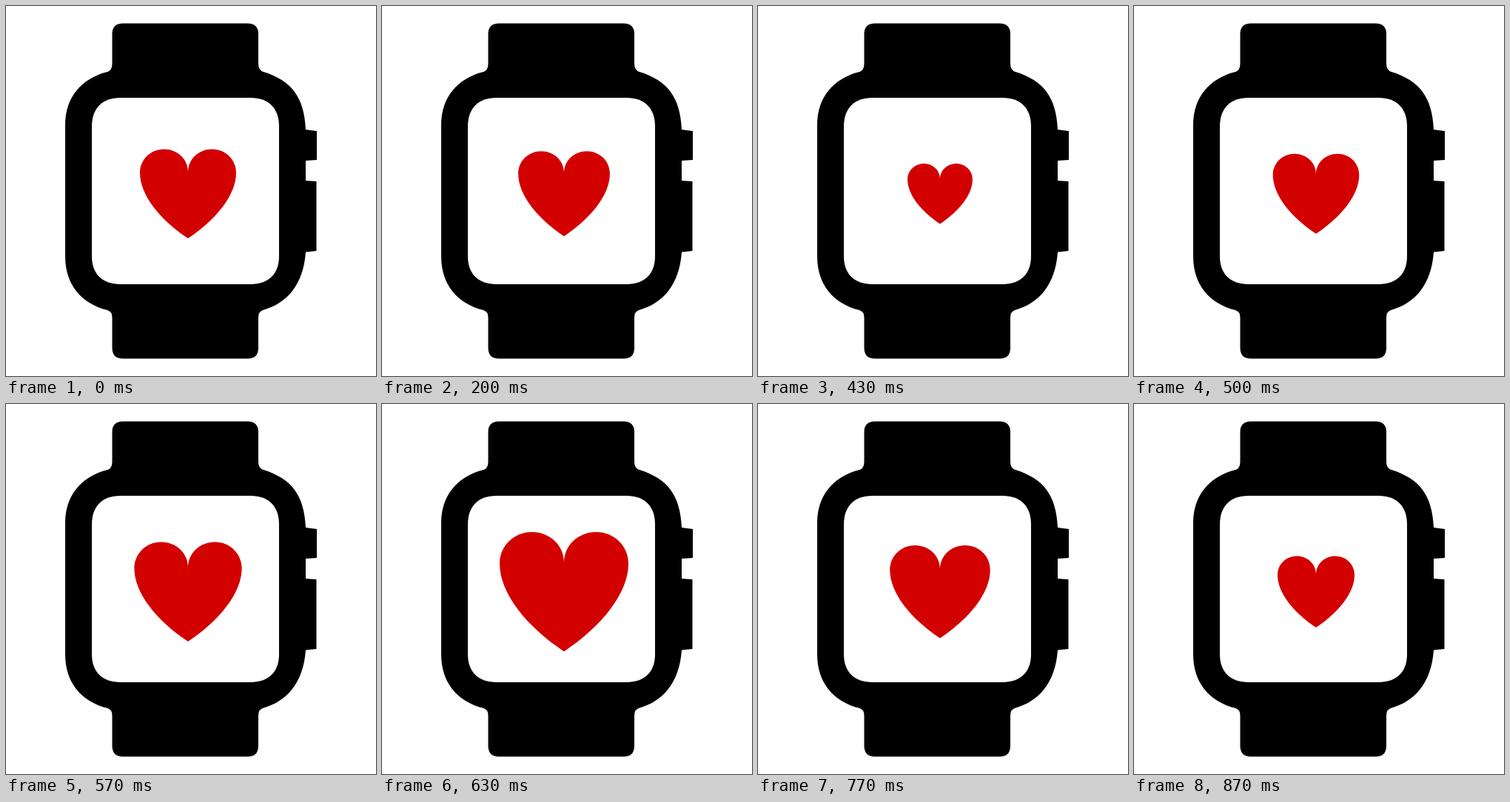
Animation, 500 px wide and 500 px high, one loop 960 ms. Source, as an HTML page:

```html
<!DOCTYPE html>
<html lang="en">
<head>
<meta charset="utf-8">
<title>Heart rate watch</title>
<style>
  html, body { margin: 0; width: 100%; height: 100%; overflow: hidden; background: #fff; }
  svg { display: block; width: 100vw; height: 100vh; }
</style>
</head>
<body>
<svg viewBox="0 0 500 500">
  <path d="M158 23.5H326.500Q341 23.500 341 38V78Q341 87 348 89C386 101 403 123 405 167
    L420 169V208L405 209V236L419.500 237V331L405 332.500C402 376 380 402 347 411Q341 413 341 421
    V462Q341 476.500 326.500 476.500H158Q143.500 476.500 143.500 462V421Q143.500 413 137 411
    C102 402 80 377 80 338V161C80 123 102 98 137 89Q143.500 87 143.500 78V38Q143.500 23.500 158 23.500Z"/>
  <path fill="#fff" d="M155 124H330C355 124 369 138 369 163V338C369 362 355 376 330 376H155
    C130 376 116 362 116 338V163C116 138 130 124 155 124Z"/>
  <path id="heart" fill="#d30000" d="M0-37C0-59-18-76-41-76S-82-58-82-36C-82 2-48 44 0 76
    C48 44 82 2 82-36C82-58 64-76 41-76S0-59 0-37Z"/>
</svg>
<script>
  const LOOP = 960, FPS = 30, HEART_WIDTH = 164;
  // [tick, heart width], linear in between
  const keys = [[0, 130], [4.8, 130], [13, 87.8], [19, 174], [23, 135.5], [26, 104], [29, 104]];
  const heart = document.getElementById('heart');

  function widthAt(tick) {
    const i = keys.findIndex(([end]) => end > tick);
    const [t0, w0] = keys[i - 1], [t1, w1] = keys[i];
    return w0 + (w1 - w0) * (tick - t0) / (t1 - t0);
  }

  function draw() {
    const time = performance.now() % LOOP;
    const tick = Math.min(28, Math.floor((time + 3.4) * FPS / 1000));
    heart.setAttribute('transform', `translate(246 253.75) scale(${widthAt(tick) / HEART_WIDTH})`);
    requestAnimationFrame(draw);
  }
  draw();
</script>
</body>
</html>
```
